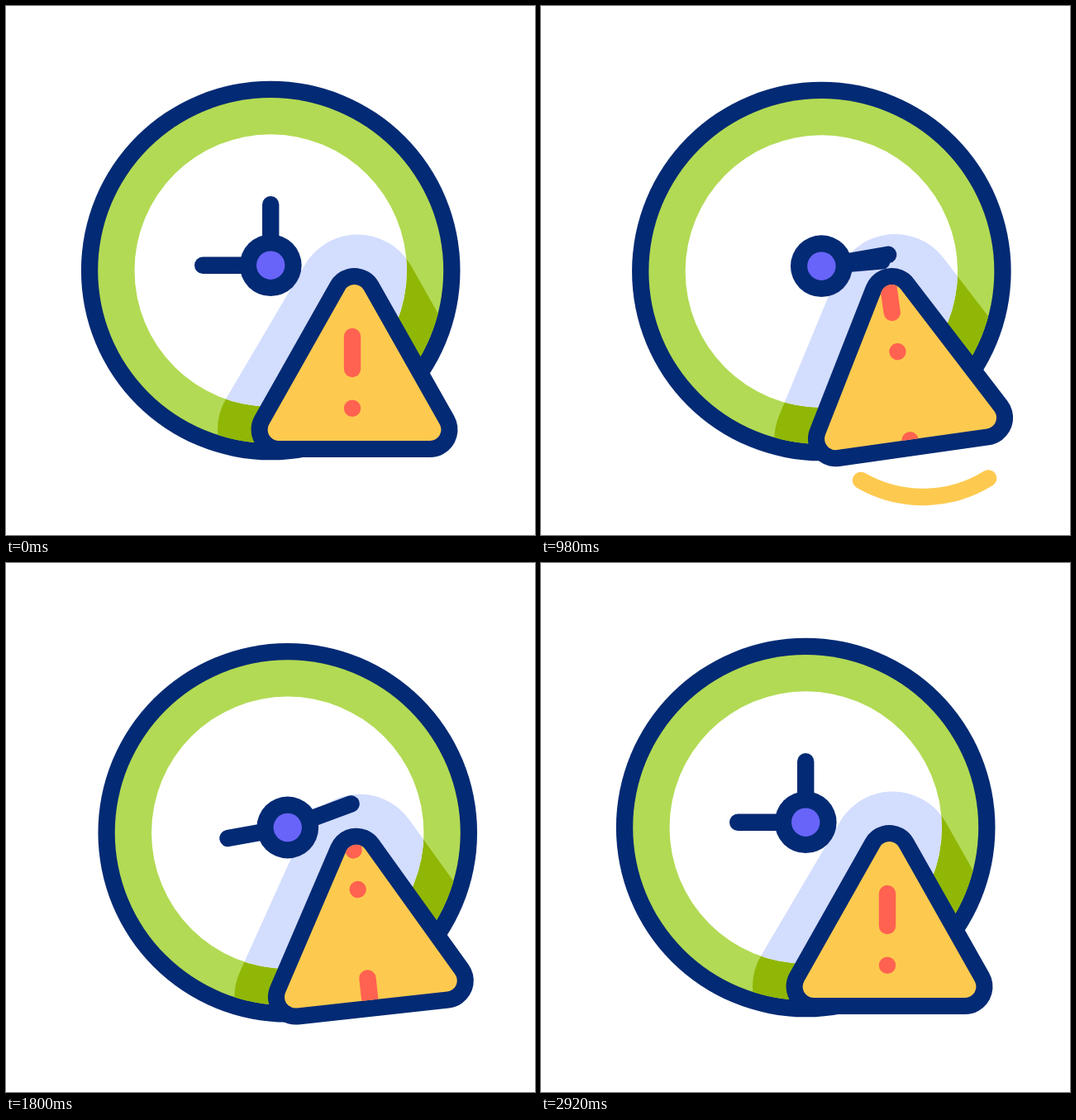
Write an HTML page with a canvas that moves like this. It is 640 px wide and 640 px high and loops after 2960 ms.

```html
<!DOCTYPE html>
<html lang="en">
<head>
<meta charset="utf-8">
<title>Clock warning</title>
<style>
  html, body { margin: 0; width: 100%; height: 100%; overflow: hidden; background: #fff; }
  canvas { display: block; width: 100vw; height: 100vh; }
</style>
</head>
<body>
<canvas id="stage" width="640" height="640"></canvas>
<script>
const ctx = document.getElementById('stage').getContext('2d');
const LOOP = 2960, STEP = 20, RAD = Math.PI / 180;
const NAVY = '#032a74', GREEN = '#b2da54', DARK_GREEN = '#90b705', PALE = '#d3ddfe',
      YELLOW = '#fdca4f', RED = '#ff6250', PURPLE = '#6864fa';

// Shared rhythm of the shake: rest, four turning points, rest
const BEATS = [260, 630, 910, 1300, 1740, 2040];

function ease(t, from, to) {
  const u = Math.min(1, Math.max(0, (t - from) / (to - from)));
  return (1 - Math.cos(Math.PI * u)) / 2;
}

// Swings from rest through the four peaks and back; lead makes it run ahead of the beat
function swing(t, lead, ...peaks) {
  const poses = [0, ...peaks, 0];
  let value = 0;
  for (let i = 1; i < poses.length; i++) {
    value += (poses[i] - poses[i - 1]) * ease(t + lead, BEATS[i - 1], BEATS[i]);
  }
  return value;
}

const clockX = t => swing(t, 0, -23, 22.7, -23, 22.7);
const clockY = t => swing(t, 76, -21.5, 11, -21.5, 11);
const signY = t => swing(t, 90, -14, 6, -10, 7.5);
const signTilt = t => swing(t, 0, 4, -9, 3.3, -6.9);
const markRun = t => 195 * (ease(t, 610, 1230) + ease(t, 1215, 2370));
const handTurn = t => 360 * (1 - (1 - Math.min(1, t / 2600) ** 2.2) ** 2.17);

function disc(x, y, r, color) {
  ctx.beginPath();
  ctx.arc(x, y, r, 0, 2 * Math.PI);
  ctx.fillStyle = color;
  ctx.fill();
}

function line(x0, y0, x1, y1, color) {
  ctx.beginPath();
  ctx.moveTo(x0, y0);
  ctx.lineTo(x1, y1);
  ctx.strokeStyle = color;
  ctx.stroke();
}

// Triangle with corners rounded by r; shift moves all but the left corner
function fillSign(r, color, shift = 0) {
  const left = 330, apex = 421.5 + shift, right = 513 + shift, top = 350.5, base = 512.5;
  const up = -Math.PI / 2;
  const leftSide = up - Math.atan2(base - top, apex - left);
  const rightSide = up + Math.atan2(base - top, right - apex);
  ctx.beginPath();
  ctx.arc(apex, top, r, leftSide, rightSide);
  ctx.arc(right, base, r, rightSide, Math.PI / 2);
  ctx.arc(left, base, r, Math.PI / 2, leftSide + 2 * Math.PI);
  ctx.closePath();
  ctx.fillStyle = color;
  ctx.fill();
}

function poseSign(t) {
  ctx.translate(421.5, 330 + signY(t));
  ctx.rotate(signTilt(t) * RAD);
  ctx.translate(-421.5, -330);
}

function shadow(t, x, y, r, color) {
  ctx.save();
  ctx.beginPath();
  ctx.arc(x, y, r, 0, 2 * Math.PI);
  ctx.clip();
  poseSign(t);
  fillSign(74, color, 4);
  ctx.restore();
}

function hand(x, y, length, degrees) {
  const a = degrees * RAD;
  line(x, y, x + length * Math.sin(a), y - length * Math.cos(a), NAVY);
}

function drawClock(t) {
  const x = 320.2 + clockX(t), y = 320 + clockY(t), hub = y - 6.3;
  disc(x, y, 229.3, NAVY);
  disc(x, y, 209, GREEN);
  shadow(t, x, y, 209, DARK_GREEN);
  disc(x, y, 164.7, '#fff');
  shadow(t, x, y, 164.7, PALE);
  const turn = handTurn(t);
  hand(x, hub, 73.5, turn);
  hand(x, hub, 82, 270 + 2 * turn);
  disc(x, hub, 37.4, NAVY);
  disc(x, hub, 17.2, PURPLE);
}

function drawSign(t) {
  ctx.save();
  poseSign(t);
  fillSign(33.5, NAVY);
  fillSign(13.4, YELLOW);
  ctx.clip();
  const run = markRun(t) % 195;
  for (const y of [run, run - 195]) {
    line(419, 400 + y, 419, 439 + y, RED);
    disc(419, 486.8 + y, 10.2, RED);
  }
  ctx.restore();
}

// Accent stroke that grows from one end, then shrinks towards the other
function accent(cx, cy, r, a0, a1, head, tail) {
  if (head <= 0 || tail >= 1) return;
  const at = f => (a0 + (a1 - a0) * f) * RAD;
  ctx.beginPath();
  ctx.arc(cx, cy, r, at(tail), at(Math.max(head, tail + 0.001)), a1 < a0);
  ctx.strokeStyle = YELLOW;
  ctx.stroke();
}

function draw(t) {
  ctx.clearRect(0, 0, 640, 640);
  ctx.lineCap = 'round';
  ctx.lineWidth = 20.4;
  drawClock(t);
  drawSign(t);
  accent(462, 444, 150, 120, 27, ease(t, 640, 1200), ease(t, 1040, 1480));
  accent(320, 320, 284, -42, 10, ease(t, 2260, 2800), ease(t, 2560, 2920));
}

const start = performance.now();
function tick() {
  const t = (performance.now() - start) % LOOP;
  draw(t - t % STEP);
  requestAnimationFrame(tick);
}
tick();
</script>
</body>
</html>
```
